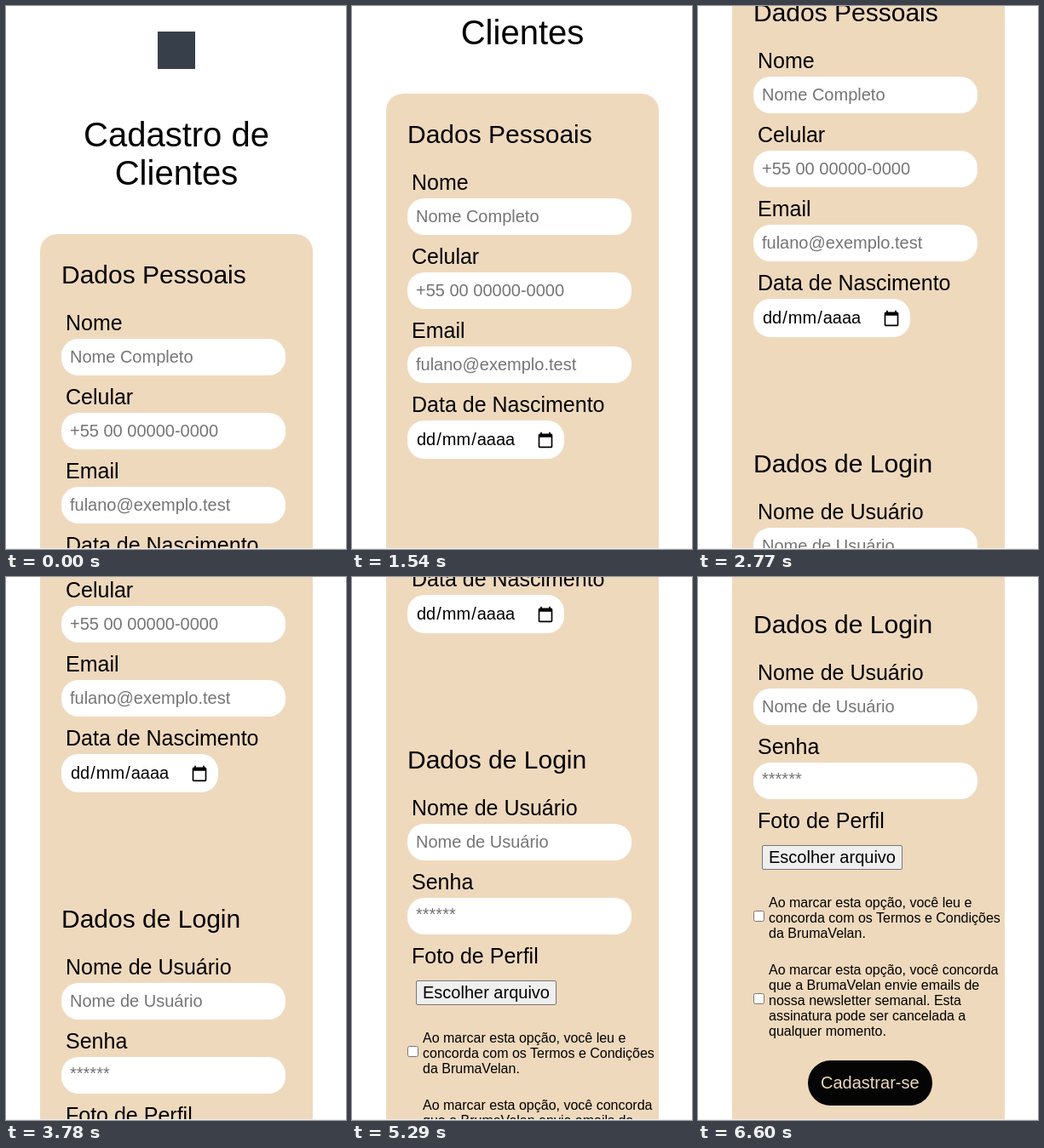
An HTML page that plays this animation: 399 px wide and 638 px high, repeating every 6.67 s.

```html
<!DOCTYPE html>
<html lang="pt-BR">
<head>
<meta charset="utf-8">
<title>Cadastro de Clientes</title>
<style>
  html, body { margin: 0; width: 100%; height: 100%; overflow: hidden; background: #fff; }
  #stage { position: relative; width: 399px; height: 638px; overflow: hidden; background: #fff; }
  #page { position: absolute; left: 0; top: 0; width: 399px; height: 1600px; }
  #page > * { position: absolute; box-sizing: border-box; }
  #edge { position: absolute; left: 0; top: 637px; width: 399px; height: 1px; background: #eee; }
  .text { font-family: "Liberation Sans", Arial, sans-serif; white-space: pre; color: #000; }
  .text i { font-style: normal; padding: 0 1px; }
  .logo { background: #373f4a; }
  .card { background: #efd9bd; border-radius: 20px; }
  .field { background: #fff; border-radius: 20px; }
  .file { background: #efefef; border: 1px solid #767676; border-radius: 2px; }
  .check { background: #fff; border: 1px solid #767676; border-radius: 2.5px; }
  .send { background: #050505; border-radius: 27px; }
</style>
</head>
<body>
<div id="stage"><div id="page"></div><div id="edge"></div></div>
<script>
const page = document.getElementById('page');

function box(kind, x, y, w, h) {
  const el = document.createElement('div');
  el.className = kind;
  el.style.cssText = `left:${x}px;top:${y}px;width:${w}px;height:${h}px`;
  page.append(el);
  return el;
}

// Places text with its baseline at y.
function text(html, x, y, size, color = '#000') {
  const up = Math.round(size * 0.905), down = Math.round(size * 0.212);
  const el = document.createElement('div');
  el.className = 'text';
  el.innerHTML = html;
  el.style.cssText =
    `left:${x}px;top:${y - up}px;font-size:${size}px;line-height:${up + down}px;color:${color}`;
  page.append(el);
  return el;
}

function centered(html, y, size) {
  const el = text(html, 0, y, size);
  el.style.width = '400px';
  el.style.textAlign = 'center';
}

const label = (name, y) => text(name, 70, y - 10, 25);

function field(name, hint, y, drop = 28) {
  label(name, y);
  box('field', 65, y, 263, 43);
  text(hint, 75, y + drop, 20, '#757575');
}

function terms(lines, y, checkY) {
  box('check', 65, checkY, 13, 13);
  lines.forEach((line, i) => text(line, 83, y + i * 18, 16));
}

box('logo', 178, 30, 44, 44);
centered('Cadastro de', 165, 40);
centered('Clientes', 210, 40);
box('card', 40, 268, 320, 1300);

text('Dados Pessoais', 65, 326, 30);
field('Nome', 'Nome Completo', 391);
field('Celular', '+55 00 00000-0000', 478);
field('Email', 'fulano@exemplo.test', 565);
label('Data de Nascimento', 652);
box('field', 65, 652, 184, 45);
text('<i>dd</i>/<i>mm</i>/<i>aaaa</i>', 75, 681, 20);
box('icon', 217, 665, 20, 20).innerHTML =
  `<svg width="20" height="20" viewBox="0 0 24 24" style="display:block">
    <path d="M20 3h-1V1h-2v2H7V1H5v2H4a2 2 0 0 0-2 2v16a2 2 0 0 0 2 2h16a2 2 0 0 0 2-2V5a2 2 0 0 0-2-2zm0 18H4V8h16z"/>
  </svg>`;

text('Dados de Login', 65, 856, 30);
field('Nome de Usuário', 'Nome de Usuário', 921);
field('Senha', '******', 1008, 26);
label('Foto de Perfil', 1095);
box('file', 75, 1105, 165, 29);
text('Escolher arquivo', 83, 1126, 20);

terms([
  'Ao marcar esta opção, você leu e',
  'concorda com os Termos e Condições',
  'da BrumaVelan.'
], 1178, 1182);
terms([
  'Ao marcar esta opção, você concorda',
  'que a BrumaVelan envie emails de',
  'nossa newsletter semanal. Esta',
  'assinatura pode ser cancelada a',
  'qualquer momento.'
], 1257, 1279);

box('send', 129, 1358, 146, 53);
text('Cadastrar-se', 144, 1391, 20, '#efd9bd');

// Scroll position: [ms, px], linear in between.
const LOOP = 6670;
const path = [[0, 0], [70, 3], [140, 3], [850, 86], [1540, 165], [2770, 308],
  [3780, 444], [4610, 542], [5970, 720], [6600, 790]];
// Runs of scroll ticks: [first ms, last ms, count].
const runs = [[0, 70, 2], [210, 850, 10], [920, 1540, 10], [1610, 2240, 10],
  [2290, 2900, 10], [2970, 3580, 10], [3640, 4260, 10], [4330, 4940, 10],
  [5010, 5630, 10], [5700, 6320, 10], [6390, 6600, 4]];

function scrollAt(t) {
  const i = Math.max(1, path.findIndex(p => p[0] >= t));
  const [t0, y0] = path[i - 1], [t1, y1] = path[i];
  return Math.round(y0 + (y1 - y0) * (t - t0) / (t1 - t0));
}

const ticks = runs.flatMap(([a, b, n]) => Array.from({ length: n }, (_, i) => {
  const t = Math.round((a + (b - a) * i / (n - 1)) / 10) * 10;
  const near = path.find(p => Math.abs(p[0] - t) <= 10);
  return near ? near[0] : t;
}));

const steps = ticks.map(t => ({
  offset: Math.max(0, t - 0.5) / LOOP,
  transform: `translateY(${-scrollAt(t)}px)`,
  easing: 'step-end'
}));
steps.push({ offset: 1, transform: steps[steps.length - 1].transform });

page.animate(steps, { duration: LOOP, iterations: Infinity });
</script>
</body>
</html>
```
